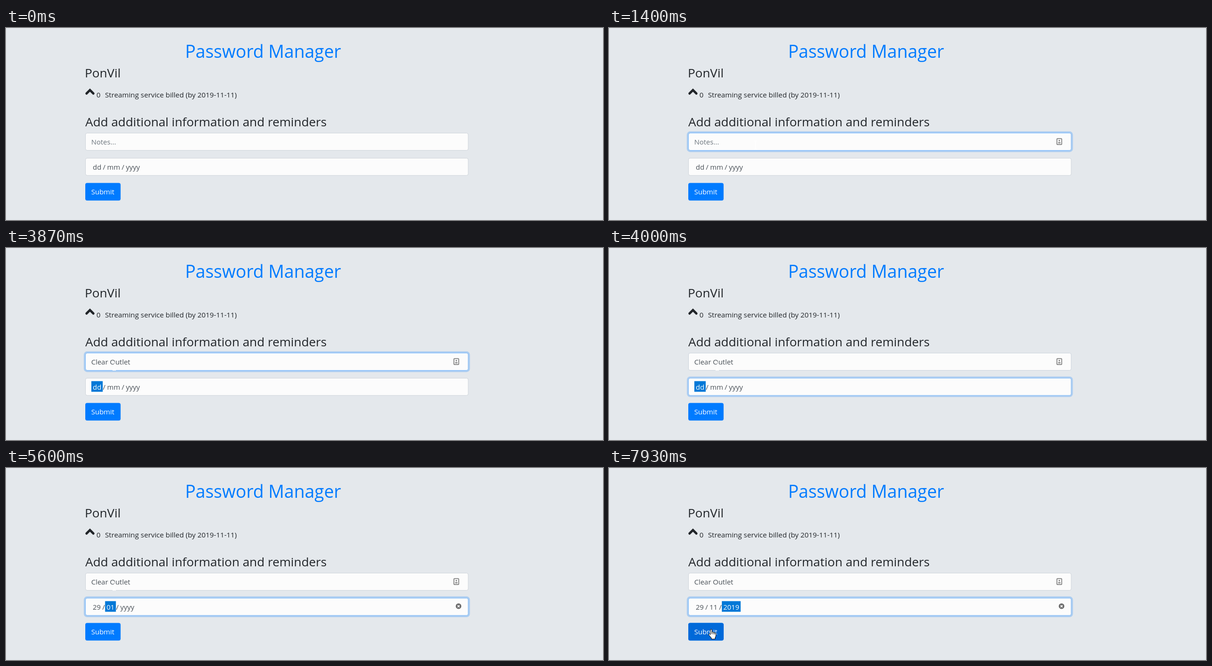
Write an HTML page that moves like this. It is 1280 px wide and 412 px high and loops after 8000 ms.

```html
<!DOCTYPE html>
<html lang="en">
<head>
<meta charset="utf-8">
<title>Password Manager</title>
<style>
  html, body { margin: 0; height: 100%; overflow: hidden; background: #e4e8ec; }
  svg { display: block; font-family: "Open Sans", "Noto Sans", sans-serif; }
  text { font-size: 15px; fill: #212529; white-space: pre; }
  .field { fill: #fcfcfc; stroke: #ced4da; }
  .border { fill: none; stroke: #80bdff; }
  .glow { fill: none; stroke: #007bff; stroke-opacity: .25; }
  .input { fill: #495057; }
</style>
</head>
<body>
<svg width="1280" height="412" viewBox="0 0 1280 412">
  <text x="383.9" y="64" style="font-size:37.6px;fill:#007bff">Password Manager</text>
  <text x="169" y="106" style="font-size:26.3px">PonVil</text>
  <path d="M172.7 140.6 180 133.3 187.3 140.6" fill="none" stroke="#212529" stroke-width="5" stroke-linecap="round"/>
  <text x="193.9" y="148.5">0</text>
  <text x="212.2" y="148.5" style="font-size:15.3px">Streaming service billed (by 2019-11-11)</text>
  <text x="170" y="211" style="font-size:26.3px">Add additional information and reminders</text>

  <rect class="glow" id="noteGlow" x="170" y="225" width="821.5" height="38" rx="4"/>
  <rect class="field" x="170.5" y="225.5" width="820.5" height="37" rx="3.5"/>
  <rect class="border" id="noteBorder" x="170.5" y="225.5" width="820.5" height="37" rx="3.5"/>
  <text class="input" id="note" x="182.7" y="249.5"></text>
  <path id="caret" d="M.5 233V254" stroke="#222"/>
  <g id="noteIcon" fill="#7d7d7d">
    <rect x="960.4" y="237.4" width="10.2" height="12.7" rx="1" fill="none" stroke="#7d7d7d" stroke-width="1.8"/>
    <circle cx="965.5" cy="241.8" r="1.6"/>
    <path d="M963 247.5V245.2H968V247.5Z"/>
  </g>

  <rect class="glow" id="dateGlow" x="170" y="278.8" width="821.5" height="38" rx="4"/>
  <rect class="field" x="170.5" y="279.3" width="820.5" height="37" rx="3.5"/>
  <rect class="border" id="dateBorder" x="170.5" y="279.3" width="820.5" height="37" rx="3.5"/>
  <rect id="mark" y="285.7" height="22.8" fill="#0078d7"/>
  <g id="date"></g>
  <g id="clear">
    <circle cx="970.3" cy="296.6" r="6" fill="#6b6b6b"/>
    <path d="M968 294.3l4.6 4.6m0-4.6-4.6 4.6" stroke="#fff" stroke-width="1.6"/>
  </g>

  <rect x="170" y="332.5" width="75.7" height="37.7" rx="4" fill="#007bff"/>
  <rect id="hover" x="170" y="332.5" width="75.7" height="37.7" rx="4" fill="#0069d9"/>
  <text x="182.7" y="357" style="fill:#fff">Submit</text>

  <g id="cursor">
    <path id="beam" d="M-3.5-8.5H-1L0-7.5 1-8.5H3.5M0-7.5V8.5M-3.5 9.5H-1L0 8.5 1 9.5H3.5" fill="none" stroke="#fff" stroke-width="1.2"/>
    <path id="arrow" d="M0 0V16L3.7 12.5 6.2 18 8.6 17 6.2 11.7H11.5Z" fill="#fff" stroke="#000"/>
    <path id="hand" d="M-1.5 11.5V1.5Q-1.5 0 0 0T1.5 1.5V6Q4 4.8 4.6 6.8 7 5.8 7.5 7.8 10.2 7 10.2 9.5V14Q10 16 8.5 18V21H.5V18.5Q-2 16-4.7 12.5-6 10.5-4.5 9.8-3 9.4-1.5 11.5M1.5 6V10.5M4.6 6.8V10.8M7.5 7.8V11.2" fill="#fff" stroke="#000" stroke-linejoin="round"/>
  </g>
</svg>
<script>
const LOOP = 8000, FOCUS = 750, TAB = 3850, HOVER = 7560;
const NOTE = "Clear Outlet";
const KEYS = [1850, 1950, 2050, 2140, 2220, 2310, 2550, 2750, 2900, 3100, 3300, 3560];
// time, day, month, year, selected part
const DATES = [
  [0, "dd", "mm", "yyyy", -1],
  [TAB, "dd", "mm", "yyyy", 0],
  [4600, "02", "mm", "yyyy", 0],
  [4990, "29", "mm", "yyyy", 1],
  [5470, "29", "01", "yyyy", 1],
  [5730, "29", "11", "yyyy", 2],
  [6130, "29", "11", "0002", 2],
  [6330, "29", "11", "0020", 2],
  [6470, "29", "11", "0201", 2],
  [6670, "29", "11", "2019", 2],
];

const $ = id => document.getElementById(id);
const clamp = v => Math.max(0, Math.min(1, v));
const ease = v => { v = clamp(v); return v * v * (3 - 2 * v); };
const fade = (t, start) => ease((t - start) / 150);
const show = (id, on) => $(id).style.opacity = +on;

// The ring grows outwards while its colour fades in; the field covers its inner half.
function focus(name, amount) {
  show(name + "Border", amount);
  show(name + "Glow", amount);
  $(name + "Glow").style.strokeWidth = 6.4 * amount;
}

const parts = Array.from({ length: 5 }, () => {
  const el = document.createElementNS("http://www.w3.org/2000/svg", "text");
  el.setAttribute("y", 303.5);
  return $("date").appendChild(el);
});

function drawNote(t) {
  const typed = KEYS.filter(k => k <= t);
  const note = $("note");
  note.textContent = NOTE.slice(0, typed.length);
  const width = typed.length ? note.getComputedTextLength() : 0;
  if (!typed.length) note.textContent = "Notes...";
  note.style.fill = typed.length ? "" : "#6c757d";
  const since = t - (typed.at(-1) ?? FOCUS);
  show("caret", t >= FOCUS && t < TAB && since % 1060 < 530);
  $("caret").setAttribute("transform", `translate(${Math.round(183 + width)} 0)`);
  show("noteIcon", t >= FOCUS);
  focus("note", fade(t, FOCUS) - fade(t, TAB + 20));
}

function drawDate(t) {
  const [, day, month, year, selected] = DATES.findLast(d => d[0] <= t);
  let x = 183;
  show("mark", selected >= 0);
  [day, "/", month, "/", year].forEach((label, i) => {
    const el = parts[i], pad = i % 2 ? .4 : 3, on = i === selected * 2;
    el.textContent = label;
    el.setAttribute("x", x + pad);
    el.style.fill = on ? "#fff" : "#495057";
    const width = el.getComputedTextLength() + 2 * pad;
    if (on) {
      $("mark").setAttribute("x", x);
      $("mark").setAttribute("width", width);
    }
    x += width;
  });
  show("clear", t >= 4600);
  focus("date", fade(t, TAB + 20));
}

function drawCursor(t) {
  const enter = ease((t - 930) / 700), leave = ease((t - 7200) / 500);
  const x = 560 - 328 * enter - 13 * leave;
  const y = 244 + 9 * enter + 93 * leave;
  const kind = y > 332 ? "hand" : y < 264 || (y > 279 && y < 316) ? "beam" : "arrow";
  for (const id of ["beam", "arrow", "hand"]) show(id, id === kind);
  show("cursor", t >= 930);
  $("cursor").setAttribute("transform", `translate(${x} ${y})`);
  show("hover", fade(t, HOVER));
}

function frame() {
  const t = performance.now() % LOOP;
  drawNote(t);
  drawDate(t);
  drawCursor(t);
  requestAnimationFrame(frame);
}
frame();
</script>
</body>
</html>
```
